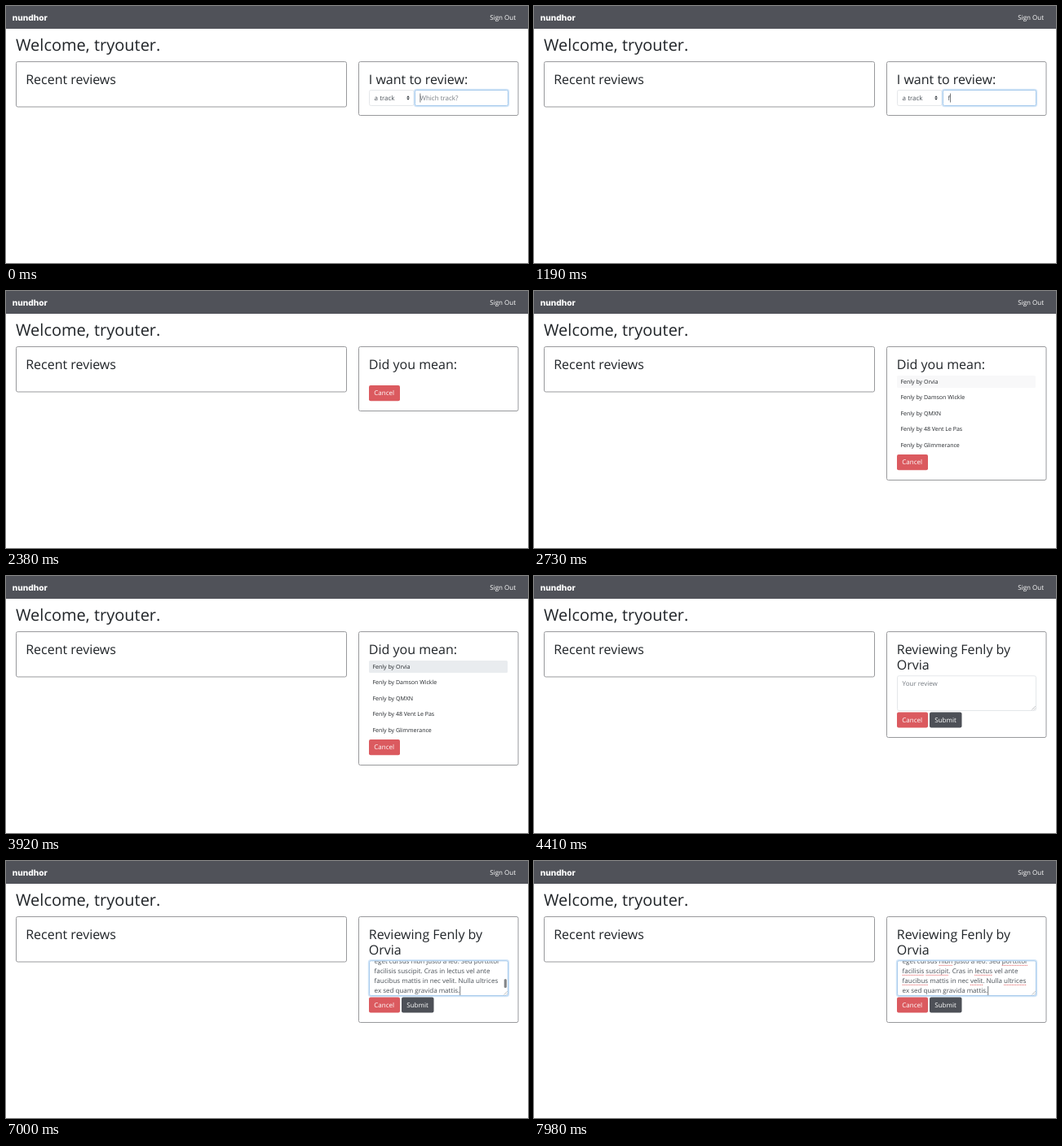
An HTML page with a canvas that plays this animation: 640x316 px, repeating every 8 s.

```html
<!DOCTYPE html>
<html lang="en">
<head>
<meta charset="utf-8">
<title>Music reviews</title>
<style>
html, body { margin: 0; width: 100%; height: 100%; overflow: hidden; background: #fff; }
canvas { display: block; width: 640px; height: 316px; }
</style>
</head>
<body>
<canvas id="stage"></canvas>
<script>
const W = 640, H = 316, LOOP = 8000;
const canvas = document.getElementById('stage');
const ctx = canvas.getContext('2d');
const dpr = window.devicePixelRatio || 1;
canvas.width = W * dpr;
canvas.height = H * dpr;

const SANS = '"Open Sans", sans-serif';
const INK = '#212529', FIELD = '#495057', HINT = '#757b82';
const BAR = '#505259', RED = '#db5a5f', LINE = '#e4e7ea';

const SONG = 'Fenly';
const ARTISTS = ['Orvia', 'Damson Wickle', 'QMXN', '48 Vent Le Pas', 'Glimmerance'];
const KEY_TIMES = [1190, 1400, 1470, 1610, 1820];
const REVIEW = [
  'eget cursus nibh justo a leo. Sed porttitor',
  'facilisis suscipit. Cras in lectus vel ante',
  'faucibus mattis in nec velit. Nulla ultrices',
  'ex sed quam gravida mattis.'
];
const MISSPELT = /nibh|porttitor|facilisis|suscipit|lectus|faucibus|velit|ultrices/g;

function text(str, x, y, size, color = INK, font = SANS, weight = 400) {
  ctx.font = `${weight} ${size}px ${font}`;
  ctx.fillStyle = color;
  ctx.fillText(str, x, y);
}

function box(x, y, w, h, r, fill, stroke, line = 1) {
  ctx.beginPath();
  ctx.roundRect(x, y, w, h, r);
  if (fill) { ctx.fillStyle = fill; ctx.fill(); }
  if (stroke) { ctx.strokeStyle = stroke; ctx.lineWidth = line; ctx.stroke(); }
}

function card(x, right, bottom) {
  box(x, 68.5, right - x, bottom - 68.5, 2, '#fff', '#98999c');
}

function field(x, y, w, h, focused) {
  if (focused) box(x - 0.5, y - 0.5, w + 1, h + 1, 2.5, null, '#d3e6f8', 2.5);
  box(x, y, w, h, 2, '#fff', focused ? '#a8cbec' : LINE);
}

function button(label, x, y, w, color) {
  box(x, y, w, 19.2, 2, color);
  text(label, x + 6.3, y + 12.4, 8, '#fff');
}

function caret(x, y, h = 11) {
  ctx.fillStyle = '#55595e';
  ctx.fillRect(x, y, 0.8, h);
}

function triangle(x, y, dy) {
  ctx.beginPath();
  ctx.moveTo(x - 1.8, y);
  ctx.lineTo(x + 1.8, y);
  ctx.lineTo(x, y + dy);
  ctx.fill();
}

function page() {
  ctx.fillStyle = '#fff';
  ctx.fillRect(0, 0, W, H);
  ctx.fillStyle = BAR;
  ctx.fillRect(0, 0, W, 28);
  text('nundhor', 7.8, 17.6, 10.2, '#fff', 'Inter, sans-serif', 800);
  text('Sign Out', 593.3, 17, 8, '#fff');
  text('Welcome, tryouter.', 12, 55, 20);
  card(12.5, 417.5, 124);
  text('Recent reviews', 24.2, 96, 16);
}

function searchPanel(t) {
  card(432.5, 628, 134.5);
  text('I want to review:', 444.8, 96, 16);
  field(445.5, 103.5, 54.5, 19, false);
  text('a track', 451.6, 115.8, 8, FIELD);
  ctx.fillStyle = '#343a40';
  triangle(493, 112.4, -2.2);
  triangle(493, 113.6, 2.2);
  field(501.5, 103.5, 114, 19, true);

  const typed = SONG.toLowerCase().slice(0, KEY_TIMES.filter(k => t >= k).length);
  if (typed) text(typed, 507.5, 115.8, 8, FIELD);
  else text('Which track?', 507.5, 115.8, 8, HINT);
  const typedWidth = typed ? ctx.measureText(typed).width : 0;
  if (t < 140 || t >= 630) caret(507.5 + typedWidth, 107.5);
}

function choicePanel(t) {
  const loaded = t >= 2730;
  card(432.5, 628, loaded ? 232.5 : 147.5);
  text('Did you mean:', 444.8, 96, 16);
  if (loaded) {
    box(445, 104, 170, 15, 1.5, t < 3920 ? '#f8f8f9' : '#e9ecef');
    ARTISTS.forEach((name, i) => text(`${SONG} by ${name}`, 449.5, 113.8 + i * 19.5, 7));
  }
  button('Cancel', 445, loaded ? 201 : 116, 38, RED);
}

function reviewText(t) {
  ctx.save();
  ctx.beginPath();
  ctx.rect(446, 123.3, 169, 41.7);
  ctx.clip();
  REVIEW.forEach((line, i) => {
    const y = 126.3 + i * 12;
    text(line, 451.6, y, 8, FIELD);
    if (t < 7420) return;
    ctx.strokeStyle = '#e46a6c';
    ctx.lineWidth = 1;
    ctx.setLineDash([1.2, 0.8]);
    for (const m of line.matchAll(MISSPELT)) {
      const x = 451.6 + ctx.measureText(line.slice(0, m.index)).width;
      ctx.beginPath();
      ctx.moveTo(x, y + 2);
      ctx.lineTo(x + ctx.measureText(m[0]).width, y + 2);
      ctx.stroke();
    }
  });
  ctx.restore();

  ctx.font = `400 8px ${SANS}`;
  if (t < 7490 || t >= 7980) caret(451.8 + ctx.measureText(REVIEW[3]).width, 154);

  // scrollbar fades in 70 ms steps
  const fade = t < 7420 ? 1 : Math.max(0, 1 - (Math.floor((t - 7420) / 70) + 1) / 5);
  ctx.globalAlpha = fade;
  box(610.7, 145, 3.2, 11, 1.6, '#85878a');
  ctx.globalAlpha = 1;
}

function reviewPanel(t) {
  card(432.5, 628, 198.5);
  text(`Reviewing ${SONG} by`, 444.8, 96, 16);
  text(ARTISTS[0], 444.8, 115.2, 16);
  field(445.5, 122.8, 170, 42.7, t >= 5670);

  if (t >= 7000) {
    reviewText(t);
  } else {
    text('Your review', 451.6, 134.8, 8, HINT);
    if ((t >= 5670 && t < 6090) || t >= 6650) caret(451.6, 126.5);
  }

  ctx.strokeStyle = '#a5a8ab';
  ctx.lineWidth = 0.7;
  ctx.beginPath();
  for (const d of [2, 4.5]) {
    ctx.moveTo(614.8 - d, 164.6);
    ctx.lineTo(614.8, 164.6 - d);
  }
  ctx.stroke();

  button('Cancel', 445, 167.4, 38, RED);
  button('Submit', 485, 167.4, 39.5, '#4d5057');
}

function draw(t) {
  ctx.setTransform(dpr, 0, 0, dpr, 0, 0);
  ctx.textRendering = 'geometricPrecision';
  page();
  if (t < 2380) searchPanel(t);
  else if (t < 4410) choicePanel(t);
  else reviewPanel(t);
}

const start = performance.now();
function tick() {
  draw((performance.now() - start) % LOOP);
  requestAnimationFrame(tick);
}
tick();
</script>
</body>
</html>
```
